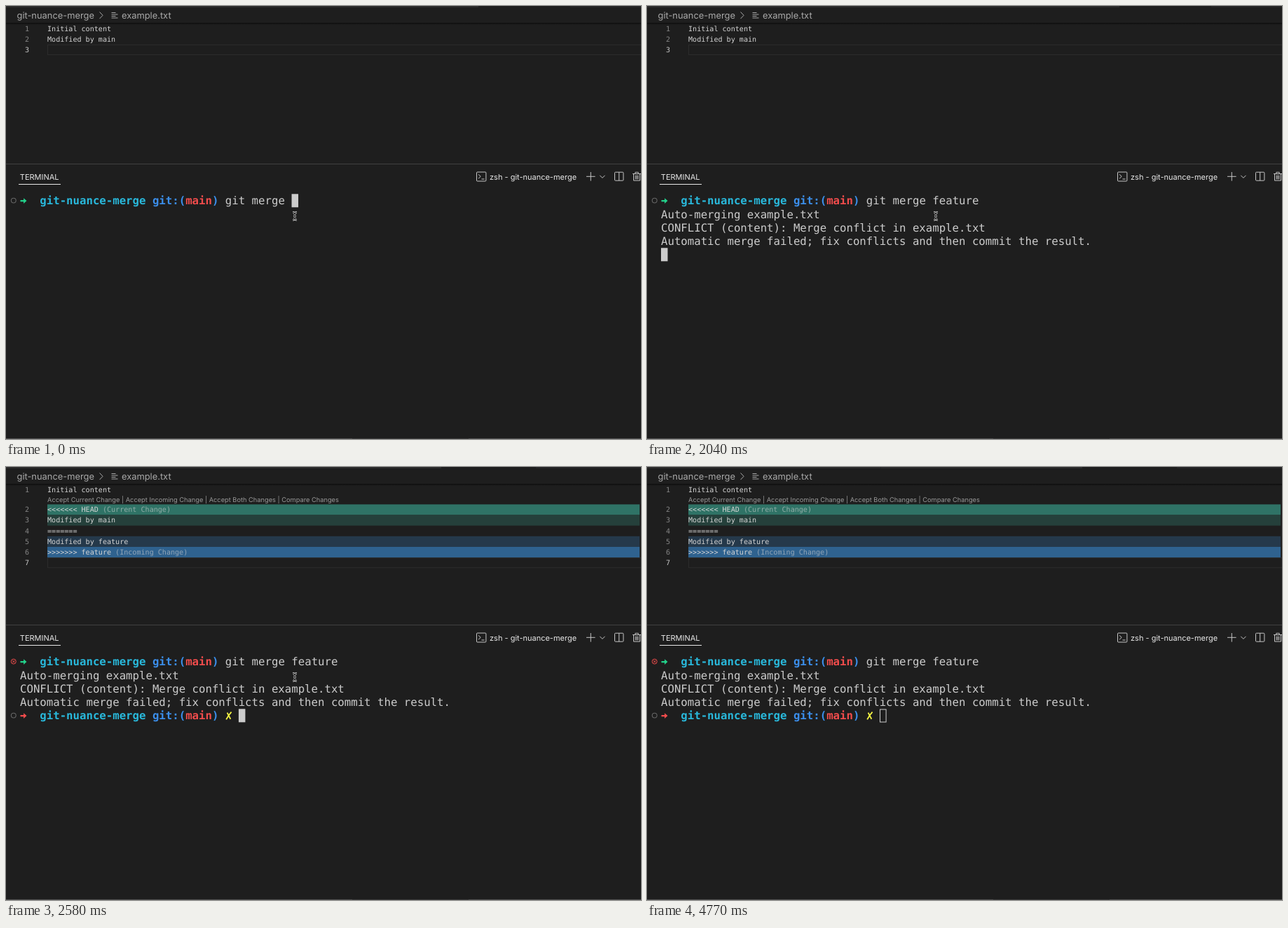
An HTML page that plays this animation: 906 px wide and 618 px high, repeating every 4790 ms.

```html
<!DOCTYPE html>
<html lang="en">
<head>
<meta charset="utf-8">
<title>Merge conflict in a terminal</title>
<style>
  html, body { margin: 0; width: 100%; height: 100%; overflow: hidden; background: #1e1e1e; }
  svg { display: block; width: 906px; height: 618px; }
  text { white-space: pre; text-rendering: geometricPrecision; }
  .ui { font-family: Inter, "Open Sans", sans-serif; font-size: 11px; fill: #e7e7e7; }
  .crumb { font-size: 12.87px; fill: #a9a9a9; }
  .lens { font-size: 9.28px; fill: #999; }
  .code { font: 10.08px "DejaVu Sans Mono", monospace; fill: #d4d4d4; }
  .num { fill: #858585; text-anchor: end; }
  .now { fill: #c6c6c6; }
  .note { fill-opacity: .6; }
  .term { font: 15.7px "DejaVu Sans Mono", monospace; fill: #ccc; }
  .term tspan { font-weight: bold; }
  .dir { fill: #29b8db; }
  .git { fill: #3b8eea; }
  .red { fill: #f14c4c; }
  .icon { fill: none; stroke: #c5c5c5; stroke-width: 1; }
  .ring { fill: none; stroke: #666; stroke-width: 1.1; }
  .edge { fill: none; stroke: #2c2c2c; }
</style>
</head>
<body>
<svg viewBox="0 0 906 618">
  <defs>
    <linearGradient id="shade" x2="0" y2="1">
      <stop offset="0" stop-color="#0d0d0d"/>
      <stop offset="1" stop-color="#1e1e1e"/>
    </linearGradient>
    <path id="arrow" d="M20.5 276.9h4.6v-2.6l4.4 3.8-4.4 3.8v-2.6h-4.6z"/>
    <path id="beam" d="M-3 -5.6Q0 -5.6 0 -2.6Q0 -5.6 3 -5.6M-3 5.6Q0 5.6 0 2.6Q0 5.6 3 5.6M0 -3V3M-2 0H2"/>
  </defs>
  <rect width="906" height="618" fill="#1e1e1e"/>

  <!-- tab strip and breadcrumb -->
  <rect width="906" height="2" fill="#252526"/>
  <rect id="tabs" height="2" fill="#2d2d2d"/>
  <rect id="activeTab" height="2" fill="#1e1e1e"/>
  <rect data-from="2670" x="333" width="1" height="2" fill="#252526"/>
  <text class="ui crumb" x="15.5" y="17.8">git-nuance-merge</text>
  <path class="icon" d="M133.5 8.5l4.6 4.8-4.6 4.8" style="stroke:#a9a9a9"/>
  <path class="icon" d="M150.5 9.5h6M150.5 12h9M150.5 14.5h6M150.5 17h9" style="stroke:#a9a9a9"/>
  <text class="ui crumb" x="165" y="17.8">example.txt</text>
  <rect y="24" width="906" height="3" fill="url(#shade)"/>

  <!-- editor -->
  <g id="first"></g>
  <g id="before" data-to="2220"></g>
  <g data-from="2220">
    <text data-from="2580" class="ui lens" x="59" y="50.2">Accept Current Change | Accept Incoming Change | Accept Both Changes | Compare Changes</text>
    <g id="conflict"></g>
  </g>

  <!-- panel header -->
  <path d="M0 225.5H906" stroke="#414141"/>
  <text class="ui" x="19.8" y="247.7">TERMINAL</text>
  <path d="M18 254.5H78" stroke="#e7e7e7"/>
  <g class="icon">
    <rect x="671.5" y="237" width="13.4" height="13" rx="1"/>
    <path d="M674 240.3l3.2 3-3.2 3M678.5 247h4"/>
    <path d="M828 243.3h12.6M834.3 237v12.6M847.3 241.8l3.6 3.6 3.6-3.6"/>
    <rect x="868.5" y="237.2" width="12.4" height="12" rx="1"/>
    <path d="M874.7 237v12M894 239.5h12M897.8 239.3v-2h4.4v2M895.5 239.5v9.6h9v-9.6M898.2 241.5v5.8M900 241.5v5.8M901.9 241.5v5.8"/>
  </g>
  <text class="ui" x="690" y="247.7">zsh - git-nuance-merge</text>

  <!-- terminal -->
  <circle class="ring" data-to="2130" cx="10.8" cy="277.6" r="3.4"/>
  <g data-from="2130">
    <g class="icon" style="stroke:#f14c4c">
      <circle cx="10.8" cy="277.6" r="3.5"/>
      <path d="M9.3 276.1l3 3M12.3 276.1l-3 3"/>
    </g>
    <circle class="ring" cx="10.8" cy="354.6" r="3.4"/>
    <use href="#arrow" y="77" class="red"/>
    <path d="M314.2 360.4Q317 354.6 321.6 349.6M315.6 350.6Q317.6 354.6 320.4 359.8" fill="none" stroke="#f5f543" stroke-width="1.8"/>
  </g>
  <use href="#arrow" fill="#23d18b"/>
  <g id="terminal"></g>
  <rect id="caret" data-to="4770" width="9.5" height="19" fill="#ccc"/>
  <rect data-from="4770" x="332.5" y="346" width="8.6" height="18" fill="none" stroke="#ccc"/>

  <path d="M0 617.5H906" stroke="#505050"/>
  <path d="M494 617.5H660" stroke="#3a3a3a"/>
  <g id="mouse" fill="none" data-to="3690">
    <use href="#beam" stroke="#ddd" stroke-width="2.4"/>
    <use href="#beam" stroke="#111" stroke-width="1"/>
  </g>
</svg>
<script>
const LOOP = 4790;
const CELL = 15.7 * 1233 / 2048, ROW = 19.25;   // terminal grid
const LINE = 15.15, LENS = 13.2;                // editor rows
const byId = id => document.getElementById(id);
const add = (id, markup) => byId(id).insertAdjacentHTML('beforeend', markup);

function codeLine(id, n, text, { bg, now } = {}) {
  const top = 25 + (n - 1) * LINE;
  const y = top + 10.9;
  if (bg) add(id, `<rect x="59" y="${top}" width="845" height="${LINE}" fill="${bg}"/>`);
  if (now) add(id, `<rect class="edge" x="59.5" y="${Math.round(top) + .5}" width="860" height="14"/>`);
  add(id, `<text class="code num ${now ? 'now' : ''}" x="33.2" y="${y}">${n}</text>` +
          `<text class="code" x="59" y="${y}">${text}</text>`);
}

function termLine(row, text, attrs = '') {
  add('terminal', `<text class="term" x="20" y="${283.4 + row * ROW}" ${attrs}>${text}</text>`);
}

const note = s => `<tspan class="note">(${s})</tspan>`;
codeLine('first', 1, 'Initial content');
codeLine('before', 2, 'Modified by main');
codeLine('before', 3, '', { now: true });
codeLine('conflict', 7, '', { now: true });
codeLine('conflict', 2, '&lt;&lt;&lt;&lt;&lt;&lt;&lt; HEAD ' + note('Current Change'), { bg: '#2f7366' });
codeLine('conflict', 3, 'Modified by main', { bg: '#25403b' });
codeLine('conflict', 4, '=======');
codeLine('conflict', 5, 'Modified by feature', { bg: '#25394b' });
codeLine('conflict', 6, '&gt;&gt;&gt;&gt;&gt;&gt;&gt; feature ' + note('Incoming Change'), { bg: '#2f628f' });

const prompt = '   <tspan class="dir">git-nuance-merge</tspan> <tspan class="git">git:(</tspan>' +
  '<tspan class="red">main</tspan><tspan class="git">)</tspan> ';
termLine(0, prompt + 'git merge <tspan id="typed" style="font-weight:normal"></tspan>');
termLine(1, 'Auto-merging example.txt', 'data-from="2040"');
termLine(2, 'CONFLICT (content): Merge conflict in example.txt', 'data-from="2040"');
termLine(3, 'Automatic merge failed; fix conflicts and then commit the result.', 'data-from="2040"');
termLine(4, prompt, 'data-from="2130"');

const word = 'feature';
const keyTimes = [450, 540, 630, 960, 1230, 1650, 1710];
const timed = [...document.querySelectorAll('[data-from], [data-to]')];

function caretCell(t, typed) {
  if (t < 2040) return [0, 41 + typed];
  return [4, t < 2130 ? 0 : 33];
}

function setBox(id, x, width) {
  byId(id).setAttribute('x', x);
  byId(id).setAttribute('width', width);
}

function render(t) {
  for (const el of timed) {
    const { from = 0, to = LOOP } = el.dataset;
    el.style.display = t >= +from && t < +to ? '' : 'none';
  }

  const typed = keyTimes.filter(k => t >= k).length;
  byId('typed').textContent = word.slice(0, typed);
  const [row, col] = caretCell(t, typed);
  byId('caret').setAttribute('x', 20 + col * CELL);
  byId('caret').setAttribute('y', 268.3 + row * ROW);

  const lens = t >= 2580;
  byId('conflict').setAttribute('transform', `translate(0 ${lens ? LENS : 0})`);
  setBox('tabs', 0, lens ? 621 : 674);
  setBox('activeTab', lens ? 621 : 674, lens ? 135 : 131);

  // pointer speeds up towards the lower right in 90 ms steps
  const step = Math.max(0, Math.min(5, Math.floor((t - 3210) / 90) + 1));
  const p = (step / 5) ** 1.6;
  byId('mouse').setAttribute('transform', `translate(${412 + 448 * p} ${299.8 + 308.5 * p})`);
}

const start = performance.now();
function tick() {
  render((performance.now() - start) % LOOP);
  requestAnimationFrame(tick);
}
tick();
</script>
</body>
</html>
```
